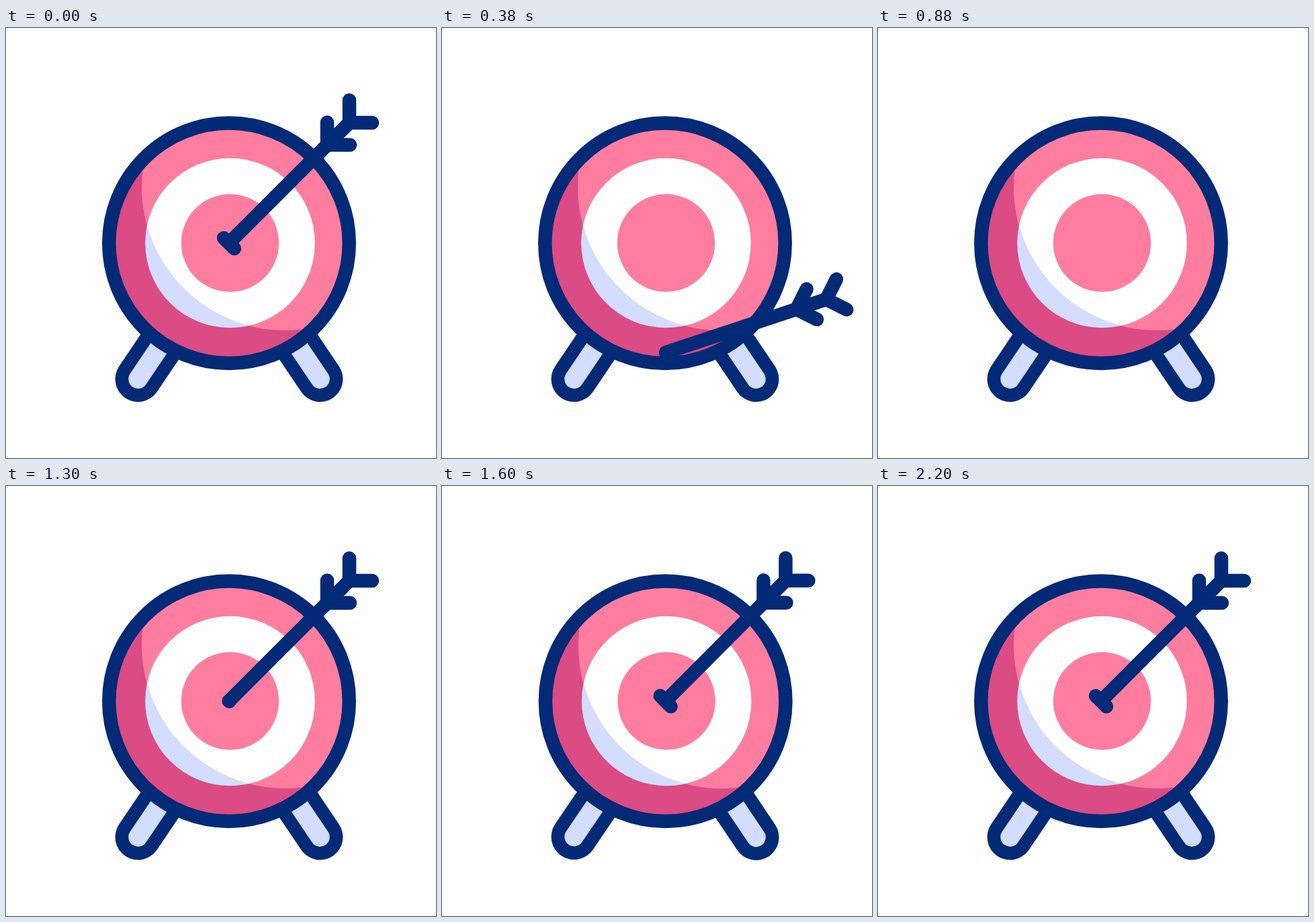
Animation, 640 px wide and 640 px high, one loop 2420 ms. Source, as an HTML page with a canvas:

```html
<!DOCTYPE html>
<html lang="en">
<head>
<meta charset="utf-8">
<title>Target</title>
<style>
html, body { margin: 0; width: 100%; height: 100%; overflow: hidden; background: #fff; }
canvas { display: block; width: 100vmin; height: 100vmin; }
</style>
</head>
<body>
<canvas id="stage" width="640" height="640"></canvas>
<script>
const ctx = document.getElementById('stage').getContext('2d');
const LOOP = 2420;
const NAVY = '#032a76', PINK = '#ff7d9f', ROSE = '#db4b84', PALE = '#d2ddff', WHITE = '#fff';
const TIP = { x: 333, y: 319 };
const PIVOT = { x: 332, y: 545 };
const LAND = 1116;

// Damped swing: [time, degrees]
const SWING = [[1300, 0], [1496, -3.7], [1683, 2.8], [1870, -1.95], [2020, 1], [2165, 0]];
const QUIVER = [...SWING.slice(0, -1), [2205, 0]];

const clamp01 = v => Math.min(1, Math.max(0, v));
const rad = deg => deg * Math.PI / 180;

function sample(keys, t) {
  if (t <= keys[0][0]) return keys[0][1];
  for (let i = 1; i < keys.length; i++) {
    const [t0, a] = keys[i - 1], [t1, b] = keys[i];
    if (t < t1) return a + (b - a) * (1 - Math.cos(Math.PI * (t - t0) / (t1 - t0))) / 2;
  }
  return keys[keys.length - 1][1];
}

function disc(x, y, r, color) {
  ctx.fillStyle = color;
  ctx.beginPath();
  ctx.arc(x, y, r, 0, Math.PI * 2);
  ctx.fill();
}

function line(points, width, color) {
  ctx.lineWidth = width;
  ctx.strokeStyle = color;
  ctx.beginPath();
  points.forEach(([x, y]) => ctx.lineTo(x, y));
  ctx.stroke();
}

function rotateAbout(p, deg) {
  ctx.translate(p.x, p.y);
  ctx.rotate(rad(deg));
  ctx.translate(-p.x, -p.y);
}

function drawLeg(side) {
  const x = 332 + side * 135.5;
  const leg = [[x, 522.5], [x - side * 56, 439.5]];
  line(leg, 68, NAVY);
  line(leg, 28.5, PALE);
}

function drawFace(outer, band) {
  disc(332, 320.3, 172, outer);
  disc(333.5, 320, 126.3, band);
}

function drawTarget() {
  drawLeg(-1);
  drawLeg(1);
  drawFace(ROSE, PALE);
  ctx.save();
  ctx.beginPath();
  ctx.arc(415, 237, 213, 0, Math.PI * 2);
  ctx.clip();
  drawFace(PINK, WHITE);
  ctx.restore();
  disc(333.5, 320, 72.7, PINK);
  ctx.lineWidth = 20.5;
  ctx.strokeStyle = NAVY;
  ctx.beginPath();
  ctx.arc(332, 320.3, 178.75, 0, Math.PI * 2);
  ctx.stroke();
}

// The arrow is drawn relative to its tip.
function drawArrow(x, y, deg, scale) {
  ctx.save();
  ctx.translate(x, y);
  ctx.rotate(rad(deg));
  ctx.scale(scale, scale);
  line([[0, 0], [178, -178]], 20.5, NAVY);
  for (const d of [145, 178]) line([[d, -d - 33.5], [d, -d], [d + 34, -d]], 20.5, NAVY);
  ctx.restore();
}

function drawHead(size) {
  if (size <= 0) return;
  const h = 8 * size;
  line([[332 - h, 320.3 - h], [332 + h, 320.3 + h]], 20.5, NAVY);
}

function render(t) {
  ctx.setTransform(1, 0, 0, 1, 0, 0);
  ctx.fillStyle = WHITE;
  ctx.fillRect(0, 0, 640, 640);
  ctx.lineCap = ctx.lineJoin = 'round';

  const swing = sample(SWING, t);
  rotateAbout(PIVOT, swing);
  drawTarget();

  if (t < 700) {
    const fall = (Math.max(0, t - 60) / 320) ** 2;
    drawArrow(TIP.x, TIP.y + 163 * fall, 26.5 * fall, 1);
    drawHead(1 - t / 100);
  } else if (t > 1000) {
    const far = (Math.max(0, LAND - t) / 16) ** 2 / 2;
    drawArrow(TIP.x - 56 * far, TIP.y + 115 * far, -1.42 * sample(QUIVER, t), 1 + far);
    drawHead(clamp01((t - 1295) / 125));
  }
}

function tick() {
  render(performance.now() % LOOP);
  requestAnimationFrame(tick);
}
tick();
</script>
</body>
</html>
```
